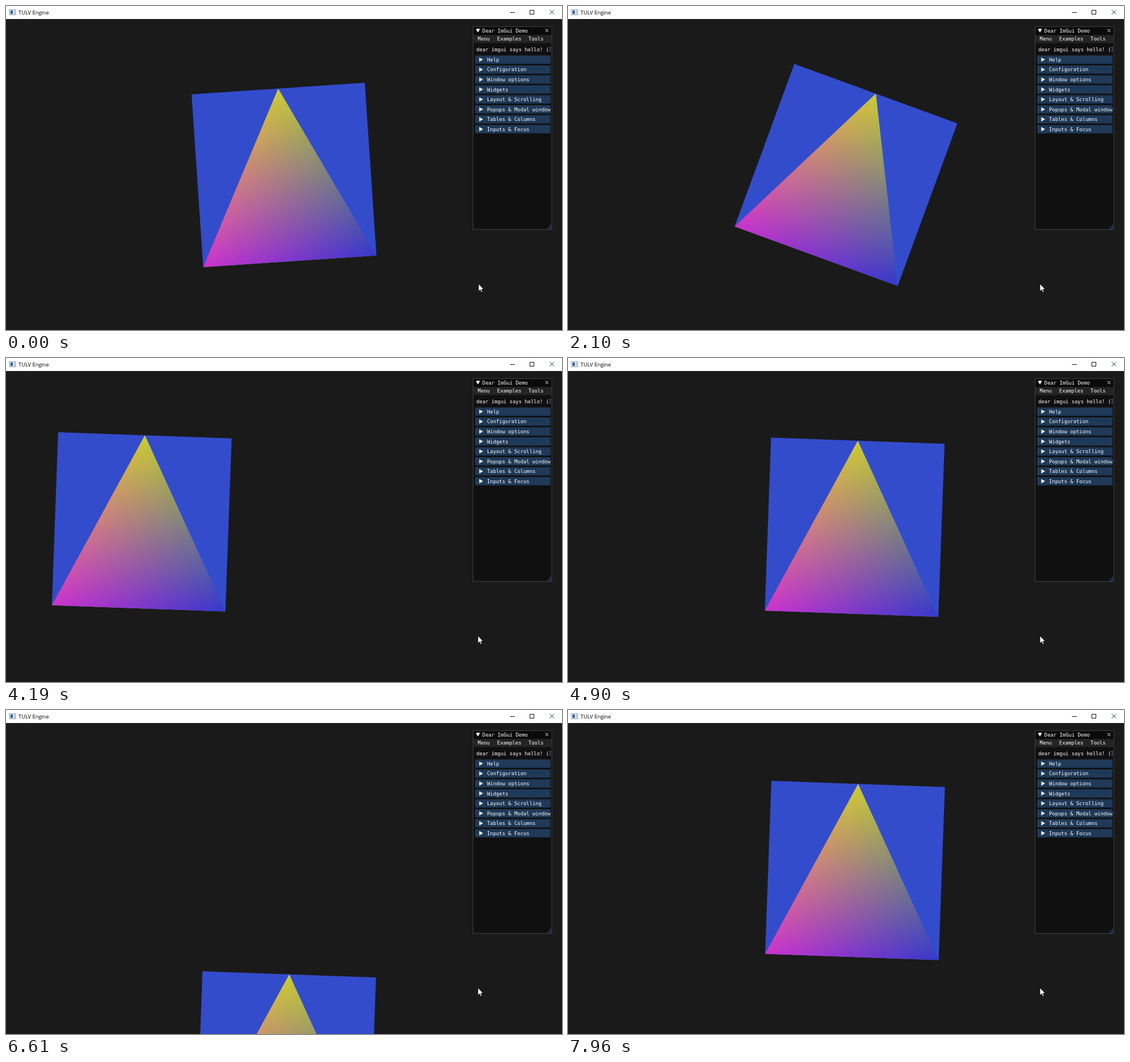
These frames come from a looping animation (979 px wide and 572 px high, 8.01 s). An HTML page with a canvas:

```html
<!DOCTYPE html>
<html lang="en">
<head>
<meta charset="utf-8">
<title>TULV Engine</title>
<style>
  html, body { margin: 0; width: 100%; height: 100%; overflow: hidden; background: #1a1a1a; }
  canvas, svg { position: absolute; left: 0; top: 0; display: block; }
  .caption { font: 9.3px "Open Sans", "Noto Sans", sans-serif; fill: #000; }
  .mono { font: 8.87px "DejaVu Sans Mono", "Liberation Mono", monospace; fill: #fff; white-space: pre; }
</style>
</head>
<body>
<canvas id="scene" width="979" height="572"></canvas>
<svg id="ui" width="979" height="572" viewBox="0 0 979 572">
  <defs>
    <clipPath id="inner"><rect x="823" y="37" width="135.7" height="357"/></clipPath>
  </defs>

  <!-- window title bar -->
  <rect width="979" height="23" fill="#fff"/>
  <rect x="6.5" y="6.5" width="10.5" height="9" fill="#eef3f8" stroke="#8295aa"/>
  <rect x="8" y="8" width="4" height="6" fill="#2c5f9e"/>
  <rect x="13" y="8" width="3" height="6" fill="#c4d2e0"/>
  <text class="caption" x="22" y="14.6">TULV Engine</text>
  <g fill="none" stroke="#111" stroke-width="1">
    <path d="M887.5 11.5h8.5"/>
    <rect x="922.5" y="7.5" width="7" height="7"/>
    <path d="M957.5 7.2l7.6 7.6M965.1 7.2l-7.6 7.6" stroke="#1b2b4a"/>
  </g>

  <!-- demo panel -->
  <rect x="822.5" y="36.5" width="138.5" height="358" fill="#0f0f0f" fill-opacity=".94"/>
  <rect x="823" y="37" width="137.5" height="14" fill="#0a0a0a"/>
  <rect x="823" y="51" width="137.5" height="14.5" fill="#242424"/>
  <path d="M951 394.3l9.8-9.8v9.8z" fill="#1a2c47"/>
  <rect x="822.5" y="36.5" width="138.5" height="358" fill="none" stroke="#404046"/>
  <path d="M827.3 40.2h7.4l-3.7 6.6z" fill="#fff"/>
  <path d="M949.8 40.4l5.4 5.6M955.2 40.4l-5.4 5.6" stroke="#fff" stroke-width=".9"/>
  <g class="mono">
    <text x="838.8" y="46.6">Dear ImGui Demo</text>
    <text x="830.6" y="61.2">Menu</text>
    <text x="864.8" y="61.2">Examples</text>
    <text x="919.8" y="61.2">Tools</text>
  </g>
  <g id="list" class="mono" clip-path="url(#inner)">
    <text x="828" y="79.8">dear imgui says hello! (1.82)</text>
  </g>

  <path id="cursor" d="M0 0V16.5L3.8 13L6.2 18.8L8.9 17.6L6.5 12H11.6Z"
        fill="#fff" stroke="#000" stroke-width="1"/>
</svg>
<script>
  const LOOP = 8010;
  const SIDE = 305.7, HALF = SIDE / 2;
  const CENTER = [489.5, 298.2];

  // [first update, last update, number of intervals]
  const RUNS = [
    [30, 820, 17], [850, 1610, 15], [1660, 2100, 9], [2100, 2480, 9],
    [2760, 3270, 11], [3930, 4240, 7], [4570, 4900, 7], [4900, 5210, 7],
    [5690, 5950, 6], [6280, 6610, 7], [6810, 7170, 8], [7170, 7450, 6],
    [7680, 7960, 6]
  ];

  // [time, value] pairs: degrees, then pixels along the square's own axes
  const TURN = [[0, -3.85], [930, -110.4], [960, -110.4], [2100, 20.1],
    [2480, 63.6], [2733, 63.6], [3270, 2.06]];
  const ACROSS = [[3882, 0], [4240, -333], [4525, -333], [4900, 15.3],
    [5166, 263], [5683, 263], [5950, 15.3]];
  const DOWN = [[6265, 0], [6610, 321], [6775, 321], [7170, -46],
    [7430, -288], [7667, -288], [7960, -15.5]];

  const ctx = document.getElementById('scene').getContext('2d');
  const cursor = document.getElementById('cursor');

  function addHeaders() {
    const names = ['Help', 'Configuration', 'Window options', 'Widgets',
      'Layout &amp; Scrolling', 'Popups &amp; Modal windows',
      'Tables &amp; Columns', 'Inputs &amp; Focus'];
    document.getElementById('list').innerHTML += names.map((name, i) => {
      const y = 87.3 + i * 17.56;
      return `<rect x="826" y="${y}" width="133" height="14.6" fill="#1f3958"/>
        <path d="M833.4 ${y + 3.6}v7.4l6.6 -3.7z" fill="#fff"/>
        <text x="847" y="${y + 10.6}">${name}</text>`;
    }).join('');
  }

  // Colours blended between the triangle's three corners
  function makeShade() {
    const size = 306;
    const tex = document.createElement('canvas');
    tex.width = tex.height = size;
    const tctx = tex.getContext('2d');
    const img = tctx.createImageData(size, size);
    const apex = [204, 204, 51], left = [204, 51, 204], right = [53, 56, 204];
    for (let y = 0, p = 0; y < size; y++) {
      for (let x = 0; x < size; x++, p += 4) {
        const a = 1 - (y + 0.5) / size;
        const r = (x + 0.5) / size - a / 2;
        const l = 1 - a - r;
        for (let c = 0; c < 3; c++) {
          img.data[p + c] = a * apex[c] + l * left[c] + r * right[c];
        }
        img.data[p + 3] = 255;
      }
    }
    tctx.putImageData(img, 0, 0);
    return ctx.createPattern(tex, 'repeat');
  }

  function valueAt(track, t) {
    if (t <= track[0][0]) return track[0][1];
    for (let i = 1; i < track.length; i++) {
      const [t0, v0] = track[i - 1], [t1, v1] = track[i];
      if (t <= t1) return v0 + (v1 - v0) * (t - t0) / (t1 - t0);
    }
    return track[track.length - 1][1];
  }

  // Time of the latest screen update
  function lastUpdate(t) {
    let at = 0;
    for (const [start, end, n] of RUNS) {
      if (t < start) break;
      const step = (end - start) / n;
      at = start + step * Math.min(n, Math.floor((t - start) / step + 1e-6));
    }
    return at;
  }

  const shade = makeShade();

  function draw(time) {
    const t = lastUpdate(time);
    ctx.setTransform(1, 0, 0, 1, 0, 0);
    ctx.fillStyle = '#1a1a1a';
    ctx.fillRect(0, 0, 979, 572);

    ctx.translate(...CENTER);
    ctx.rotate(valueAt(TURN, t) * Math.PI / 180);
    ctx.translate(valueAt(ACROSS, t) - HALF, valueAt(DOWN, t) - HALF);
    ctx.fillStyle = '#334ccc';
    ctx.fillRect(0, 0, SIDE, SIDE);

    ctx.beginPath();
    ctx.moveTo(HALF, 0);
    ctx.lineTo(SIDE, SIDE);
    ctx.lineTo(0, SIDE);
    ctx.closePath();
    ctx.fillStyle = shade;
    ctx.fill();

    const x = time < 1800 ? 832 : 831;
    cursor.setAttribute('transform', `translate(${x} 490.5) scale(.8)`);
  }

  const began = performance.now();
  function tick() {
    draw((performance.now() - began) % LOOP);
    requestAnimationFrame(tick);
  }

  addHeaders();
  tick();
</script>
</body>
</html>
```
